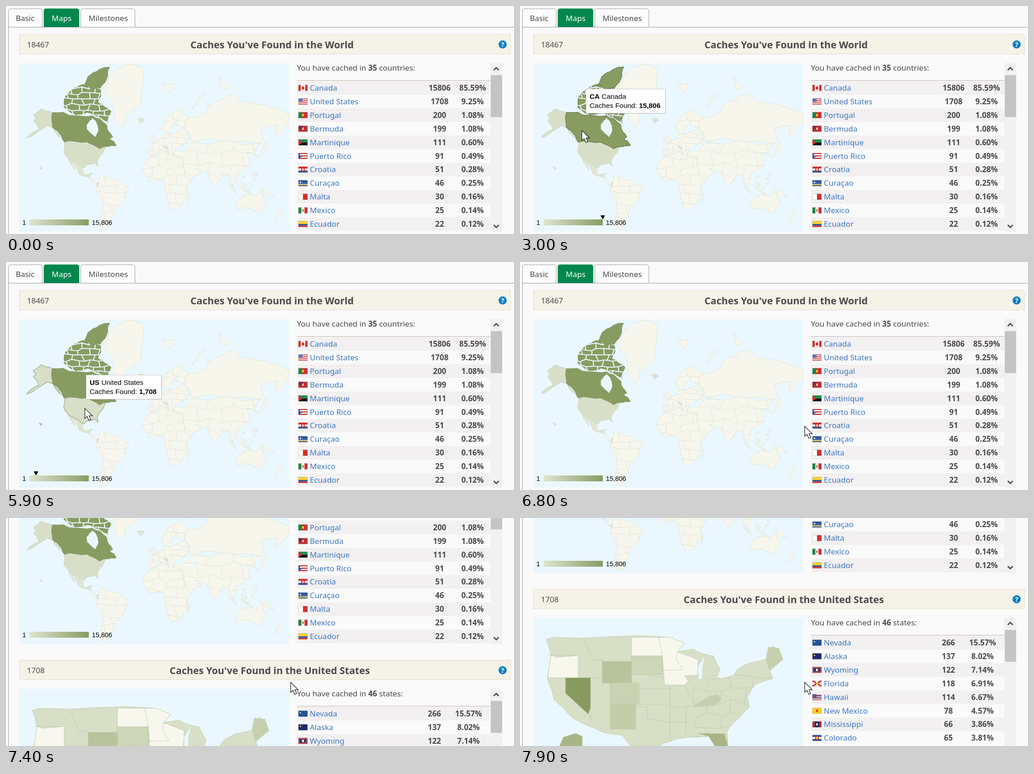
These frames come from a looping animation (1117x501 px, 8 s). An HTML page:

```html
<!DOCTYPE html>
<html lang="en">
<head>
<meta charset="utf-8">
<title>Cache statistics</title>
<style>
html, body { margin: 0; width: 100%; height: 100%; overflow: hidden; background: #fafafa; }
svg { display: block; width: 1117px; height: 501px; }
text { font: 17px "Noto Sans", "Open Sans", sans-serif; fill: #4a4a4a; white-space: pre; }
.b { font-weight: 700; }
.mid { text-anchor: middle; }
.title { font-size: 21.4px; font-weight: 700; text-anchor: middle; }
.link { fill: #3d76c2; }
.arial { font: 14.5px "Liberation Sans", Arial, sans-serif; fill: #000; }
.tip text { font: 15.4px "Liberation Sans", Arial, sans-serif; fill: #000; }
.land { fill: #f6f6ec; stroke: #e2e5d6; }
.sea { fill: #eaf7fe; }
.canada { fill: #889c62; stroke: #7b8e57; stroke-width: .6; }
.usa { fill: #d8dfc8; stroke: #c9d1b7; stroke-width: .8; }
.pale { fill: #dfe5d3; stroke: #cdd5bf; stroke-width: .8; }
.border { fill: none; stroke: #e2e5d6; }
.channel { fill: none; stroke: #eaf7fe; stroke-width: 2.2; }
.state { stroke: #bcc8a4; stroke-width: .8; }
.canada.hot { stroke: #66774b; stroke-width: 1.3; }
.usa.hot { stroke: #b0b7a3; stroke-width: 1.7; }
</style>
</head>
<body>
<svg id="stage" viewBox="0 0 1117 501"></svg>
<script>
let seed = 7;
const random = () => (seed = seed * 16807 % 2147483647) / 2147483647;
const jitter = size => (random() - .5) * size;

const rect = (x, y, w, h, fill, more = '') =>
  `<rect x="${x}" y="${y}" width="${w}" height="${h}" fill="${fill}" ${more}/>`;
const text = (x, y, cls, s) => `<text x="${x}" y="${y}" class="${cls}">${s}</text>`;
const path = (d, cls, more = '') => `<path d="${d}" class="${cls}" ${more}/>`;
const bold = s => `<tspan class="b">${s}</tspan>`;

// Coastline: each side of a coarse polygon is split twice with a random sideways shift
function coast(corners, wobble = .2) {
  let points = corners.split(' ').map(p => p.split(',').map(Number));
  for (let pass = 0; pass < 2; pass++) {
    points = points.flatMap(([x, y], i) => {
      const [nx, ny] = points[(i + 1) % points.length], shift = jitter(wobble);
      return [[x, y], [(x + nx) / 2 + (ny - y) * shift, (y + ny) / 2 - (nx - x) * shift]];
    });
  }
  return 'M' + points.map(p => p.map(v => v.toFixed(1))).join('L') + 'z';
}
// Borders: brick pattern on a shaken lattice
function bricks(x, y, w, h, size) {
  const grid = [];
  for (let r = 0; r <= h / size + 1; r++) {
    grid.push([]);
    for (let c = 0; c <= w / size + 1; c++)
      grid[r].push([x + c * size + jitter(size * .6), y + r * size + jitter(size * .6)].map(Math.round));
  }
  return grid.map((line, r) => 'M' + line.join('L') + line.map((p, c) =>
    (r + c) % 2 && grid[r + 1] ? `M${p}L${grid[r + 1][c]}` : '').join('')).join('');
}
let clips = 0;
function divide(outline, box, size, cls) {
  const id = 'clip' + clips++;
  return `<clipPath id="${id}"><path d="${outline}"/></clipPath>` +
    path(bricks(...box, size), cls, `clip-path="url(#${id})"`);
}
function region(cls, corners, box, size, lines = 'border') {
  const outline = coast(corners);
  return path(outline, cls) + (size ? divide(outline, box, size, lines) : '');
}

const arctic = '127,222 129,203 140,188 168,172 188,176 208,184 208,200 202,212 231,231 224,256 203,243 178,234 150,240';
const worldMap = rect(29, 126, 594, 370, '#eaf7fe') + [
  ['land', '212,179 223,172 230,150 246,137 268,128 304,138 300,175 295,216 264,240 254,268 240,250 236,215'],
  ['land', '183,376 192,380 205,394 196,393'],
  ['land', '204,384 210,371 242,382 270,400 260,425 243,445 224,476 222,492 212,488 209,465 213,432 198,405', [195, 370, 80, 125], 21],
  ['land', '318,331 349,319 385,331 406,372 416,370 398,398 398,418 375,446 364,447 354,424 346,384 314,383 299,362', [300, 318, 120, 130], 19],
  ['land', '402,413 406,408 399,431'],
  ['land', '312,315 325,312 320,304 344,290 349,282 370,280 392,268 404,296 372,314 366,328 350,312 358,326 344,314 318,331', [310, 265, 95, 65], 13],
  ['land', '341,270 358,240 382,227 404,247 390,268 374,262 376,250 364,266 358,284', [340, 225, 65, 60], 25],
  ['land', '320,301 325,294 322,282 334,297'],
  ['land', '313,290 320,289 316,297'],
  ['land', '392,268 397,248 442,230 446,218 475,206 500,192 520,211 622,236 622,254 592,285 596,262 560,268 566,288 560,302 410,298'],
  ['land', '398,312 410,298 560,302 546,318 549,329 528,322 537,350 507,370 505,389 496,392 505,405 490,373 476,368 459,396 447,372 416,356 430,367 404,384 388,350 389,334 368,328 372,320', [365, 295, 190, 110], 26],
  ['land', '410,226 418,205 437,191 418,218'],
  ['land', '343,173 371,170 358,192'],
  ['land', '470,156 490,180 478,184'],
  ['land', '568,300 576,304 562,328 550,333 564,316'],
  ['land', '489,388 510,411 504,409'],
  ['land', '515,398 528,388 526,408'],
  ['land', '556,400 570,403 590,421 572,416'],
  ['land', '506,432 535,412 551,418 563,407 572,432 558,457 538,446 508,447'],
  ['land', '603,447 608,456 588,474'],
  ['pale', '288,249 298,246 305,251 296,258'],
  ['pale', '138,337 150,343 166,349 172,372 190,366 184,377 160,369 144,342 152,360'],
  ['pale', '198,391 205,388 202,398'],
  ['pale', '346,309 354,308 357,315'],
  ['usa', '102,234 76,226 60,238 66,246 60,252 72,271 46,290 90,264 102,267 120,290 106,274'],
  ['usa', '128,299 178,299 205,314 221,305 216,317 205,332 201,340 203,352 196,345 178,349 172,356 150,343 138,337 127,318'],
  ['usa', '74,354 79,356 77,359'],
  ['canada', arctic, [122, 168, 115, 90], 12, 'channel'],
  ['canada', '172,172 180,155 205,139 228,134 224,154 207,181 186,182'],
  ['canada', '102,234 150,241 190,241 208,249 222,262 235,288 228,291 243,306 232,307 206,314 196,308 178,299 128,299 112,274 102,267'],
  ['sea', '190,246 178,260 178,271 196,288 203,270 199,256'],
  ['sea', '374,313 384,307 394,316 378,319'],
  ['sea', '411,310 419,312 420,328 415,328']
].map(shape => region(...shape)).join('') +
  // Small islands of south-east Asia
  Array.from({ length: 14 }, (_, i) => {
    const x = 542 + jitter(22) - i % 3 * 8, y = 366 + i * 3.8;
    return path(`M${x} ${y}l${5 + jitter(4)} 2l-2 ${4 + jitter(3)}z`, 'land');
  }).join('') +
  rect(52, 469, 130, 13, 'url(#scale)') +
  text(36, 481, 'arial', '1') + text(189, 481, 'arial', '15,806') +
  '<path id="marker" d="M-5 460H5L0 469z"/>';

// Map of the states, with its own origin
const usOutline = coast('58,268 75,263 325,263 362,276 346,295 380,289 398,298 425,304 440,333 432,352 445,354 470,347 478,334 505,319 541,311 557,282 573,298 578,312 549,337 556,354 516,367 500,395 504,417 473,448 455,469 457,505 445,505 415,481 345,486 293,506 245,505 225,478 182,472 115,440 75,400 60,352 68,303', .06);
const eastOutline = usOutline.replace('M', 'M'); 
const state = (d, fill) => path(d, 'state', `fill="${fill}"`);
const stateMap = rect(29, 220, 594, 370, '#eaf7fe') + state(usOutline, '#d8dfc7') +
  divide(eastOutline, [385, 350, 190, 140], 27, 'state" fill="none') +
  state('M62 303H128M139 263L160 314H181V352M61 352H181M155 352V452M245 263V364M245 340L318 352 330 376H262M330 376V487M198 410H331M254 416H280V442L331 450H370M254 410V465H207M320 368H362L385 416H331M365 416V478', 'none') +
  state('M68 303L82 307 128 303V352H61z', '#f8f7ee') +
  state('M245 263H330L362 276 346 295 392 312 390 347H362L370 360 362 368H318L313 304H245z', '#f8f7ee') +
  state('M305 263L313 304V335H358L344 312 346 295', 'none') +
  state('M245 304H313V345H245z', '#cdd6b7') +
  state('M181 316H245V364H181z', '#b8c49d') +
  state('M198 363H262V410H198z', '#c9d3b2') +
  state('M198 410H254V465H198z', '#c3cea9') +
  state('M380 416L418 392 436 390 442 400 428 413z', '#c6d0ae') +
  state('M541 311L546 285 569 287 578 312 549 336z', '#c6d0ae') +
  state('M390 474L450 475 458 505H430L415 481z', '#a8b687') +
  state('M86 505L95 483 122 474 137 481V505z', '#a8b687') +
  state('M100 352H155V418L150 432 100 386z', '#879b60') +
  path('M393 354L391 328 406 305 401 328 400 355z', 'sea');

// Flags: equal stripes across or down, then [colour, emblem] pairs
const emblems = {
  dot: 'M8 4H12V9H8z', square: 'M6 3H14V10H6z', star: 'M3 3H6V6H3z',
  canton: 'M0 0H9V7H0z', hoist: 'M0 0L9 6.5 0 13z', diamond: 'M10 2L14 7 10 11 6 7z',
  panel: 'M3 3H17V10H3z', saltire: 'M0 0H3L20 11V13H17L0 2zM17 0H20V2L3 13H0V11z'
};
function flag(y, direction, colours, ...overlays) {
  const list = colours.split(' '), n = list.length;
  const stripes = list.map((c, i) => direction === 'v'
    ? rect(i * 20 / n, 0, 20 / n, 13, c) : rect(0, i * 13 / n, 20, 13 / n, c)).join('');
  return `<g transform="translate(643 ${y - 6.5})">${stripes}` +
    overlays.map(([c, emblem]) => `<path d="${emblems[emblem]}" fill="${c}"/>`).join('') +
    rect(.5, .5, 19, 12, 'none', 'stroke="#555" stroke-opacity=".25"') + '</g>';
}
const R = '#d5302c', W = '#fff', B = '#2c52a0', G = '#1c8548', Y = '#f8d22c', N = '#1d2871';
const countries = [
  ['Canada', '15806', '85.59%', 'v', `${R} ${W} ${W} ${R}`, [R, 'diamond']],
  ['United States', '1708', '9.25%', 'h', `${R} ${W} ${R} ${W} ${R} ${W} ${R}`, ['#5d79bd', 'canton']],
  ['Portugal', '200', '1.08%', 'v', `${G} ${G} ${R} ${R} ${R}`, [Y, 'dot']],
  ['Bermuda', '199', '1.08%', 'h', '#c42f2e', ['#7a2c4c', 'canton'], ['#d8b8b5', 'dot']],
  ['Martinique', '111', '0.60%', 'h', '#159447 #111', [R, 'hoist']],
  ['Puerto Rico', '91', '0.49%', 'h', `${R} ${W} ${R} ${W} ${R}`, [B, 'hoist'], [W, 'star']],
  ['Croatia', '51', '0.28%', 'h', `${R} ${W} ${B}`, [R, 'square'], ['#f3b5b2', 'dot']],
  ['Curaçao', '46', '0.25%', 'h', `${B} ${B} ${B} ${B} ${Y} ${B}`, [W, 'star']],
  ['Malta', '30', '0.16%', 'v', `${W} ${R}`],
  ['Mexico', '25', '0.14%', 'v', `${G} ${W} ${R}`, ['#a4864d', 'dot']],
  ['Ecuador', '22', '0.12%', 'h', `${Y} ${Y} ${B} ${R}`]
];
const stateRows = [
  ['Nevada', '266', '15.57%', 'h', '#245393', ['#b9c6cf', 'star']],
  ['Alaska', '137', '8.02%', 'h', N, [Y, 'star']],
  ['Wyoming', '122', '7.14%', 'h', '#b54251', ['#253e73', 'panel'], [W, 'dot']],
  ['Florida', '118', '6.91%', 'h', W, [R, 'saltire'], [Y, 'dot']],
  ['Hawaii', '114', '6.67%', 'h', `${W} ${R} ${B} ${W} ${R} ${B} ${W} ${R}`, ['#6d5288', 'canton']],
  ['New Mexico', '78', '4.57%', 'h', '#fccf21', [R, 'dot']],
  ['Mississippi', '66', '3.86%', 'v', `#b92d39 ${N} ${N} #b92d39`, ['#e7d38f', 'dot']],
  ['Colorado', '65', '3.81%', 'h', `${B} ${W} ${B}`, [R, 'square'], [Y, 'dot']]
];

function row([name, count, share, ...art], i, countX, shareX) {
  const y = 180 + i * 29.9;
  return (i % 2 ? '' : rect(640, y - 15, 425, 30, '#f2f0f1')) + flag(y, ...art) +
    text(668, y + 6, 'link', name) +
    text(countX, y + 6, 'b mid', count) + text(shareX, y + 6, 'b mid', share);
}
function section(total, title, titleX, found, kind, rows, countX, shareX, thumb) {
  const chevron = d => `<path d="${d}" fill="none" stroke="#505050" stroke-width="3"/>`;
  return rect(29.5, 62.5, 1080, 43, '#f5f2e8', 'stroke="#e8dcc8"') +
    text(46, 91, '', total) + text(titleX, 93, 'title', title) +
    '<circle cx="1092" cy="84.5" r="9" fill="#0d7fc5"/>' +
    '<text x="1092" y="90" class="b mid" style="fill:#fff;font-size:15px">?</text>' +
    text(639.7, 142, '', `You have cached in ${bold(found)} ${kind}:`) +
    rect(640, 163, 425, 1, '#c1aaa6') +
    rows.map((r, i) => row(r, i, countX, shareX)).join('') +
    rect(1065, 125, 26, 371, '#f1f1f1') + rect(1066, 152, 25, thumb, '#c4c4c4') +
    chevron('M1072.5 141L1078 135.5 1083.5 141') + chevron('M1072.5 481L1078 486.5 1083.5 481');
}
const tab = (x, w, label, textX, active) =>
  `<path d="M${x} 46V11q0-5 5-5h${w - 10}q5 0 5 5V46" fill="${active ? '#02874d' : '#fcfcfc'}" stroke="${active ? '#02874d' : '#999'}"/>` +
  `<text x="${textX}" y="33" ${active ? 'style="fill:#fff"' : ''}>${label}</text>`;
const tip = (id, x, y, w, code, name, count) =>
  `<g id="${id}" class="tip">${rect(x + 2, y + 2, w, 53, '#000', 'opacity=".1"')}` +
  rect(x + .5, y + .5, w, 53, '#fff', 'stroke="#ccc"') +
  text(x + 8, y + 21.5, '', `${bold(code)} ${name}`) +
  text(x + 8, y + 42, '', `Caches Found: ${bold(count)}`) + '</g>';

const stage = document.getElementById('stage');
stage.innerHTML =
  '<defs><linearGradient id="scale"><stop stop-color="#dde4cf"/><stop offset="1" stop-color="#889c62"/></linearGradient></defs>' +
  rect(0, 0, 1117, 501, '#fafafa') + '<g id="page">' +
  tab(5.5, 74, 'Basic', 21.5, false) + tab(83.5, 77, 'Maps', 100.5, true) + tab(164.5, 119, 'Milestones', 181.5, false) +
  '<path d="M1117 46.5H5.5V1000" fill="none" stroke="#999"/>' +
  section('18467', "Caches You've Found in the World", 585, '35', 'countries', countries, 953.5, 1026, 92) +
  worldMap +
  `<g transform="translate(0 469)">${section('1708', "Caches You've Found in the United States", 580, '46', 'states', stateRows, 942, 1017, 70)}</g>` +
  `<g transform="translate(0 374)">${stateMap}</g>` +
  tip('canadaTip', 145, 182, 174, 'CA', 'Canada', '15,806') +
  tip('usaTip', 176, 248, 165, 'US', 'United States', '1,708') + '</g>' +
  '<path id="cursor" d="M0 0V22L5 17.5 9 26.5 13 24.7 9.3 16.3H16.5z" fill="#fff" stroke="#111" stroke-width="1.2"/>';

const el = id => document.getElementById(id);
const show = (id, on) => el(id).setAttribute('visibility', on ? 'visible' : 'hidden');
const move = (id, x, y) => el(id).setAttribute('transform', `translate(${x} ${y})`);
const progress = (t, from, to) => Math.min(1, Math.max(0, (t - from) / (to - from)));

// [start, end, x, y]: the pointer swings sideways gently while it sinks steadily
const moves = [
  [100, 800, 70, 60], [800, 900, 55, 149], [900, 1600, 128, 252],
  [2700, 3600, 159, 317], [5800, 6750, 626, 361]
];
const pointerAt = t => moves.reduce(([x, y], [from, to, nextX, nextY]) => {
  const u = progress(t, from, to);
  return [x + (nextX - x) * u * u * (3 - 2 * u), y + (nextY - y) * u];
}, [948, 2]);

// [start, end]: each wheel notch glides the page by 125 pixels
const notches = [[7000, 7300], [7300, 7600], [7700, 7900]];
const scrollAt = t => Math.round(notches.reduce((sum, [from, to]) =>
  sum + 125 * (1 - (1 - progress(t, from, to)) ** 3.4), 0));

const heat = (cls, on) =>
  stage.querySelectorAll(cls).forEach(shape => shape.classList.toggle('hot', on));

function draw(now) {
  const t = Math.floor(now % 8000 / 100) * 100;
  const onCanada = t >= 1300 && t < 3400, onUsa = t >= 3400 && t < 6100;
  move('page', 0, -scrollAt(t));
  move('cursor', ...pointerAt(t));
  show('cursor', t >= 100);
  heat('.canada', onCanada);
  heat('.usa', onUsa);
  show('marker', onCanada || onUsa);
  move('marker', onUsa ? 66 : 182, 0);
  show('canadaTip', onCanada && t >= 1500);
  show('usaTip', onUsa && t >= 3700);
  requestAnimationFrame(draw);
}
draw(0);
</script>
</body>
</html>
```
